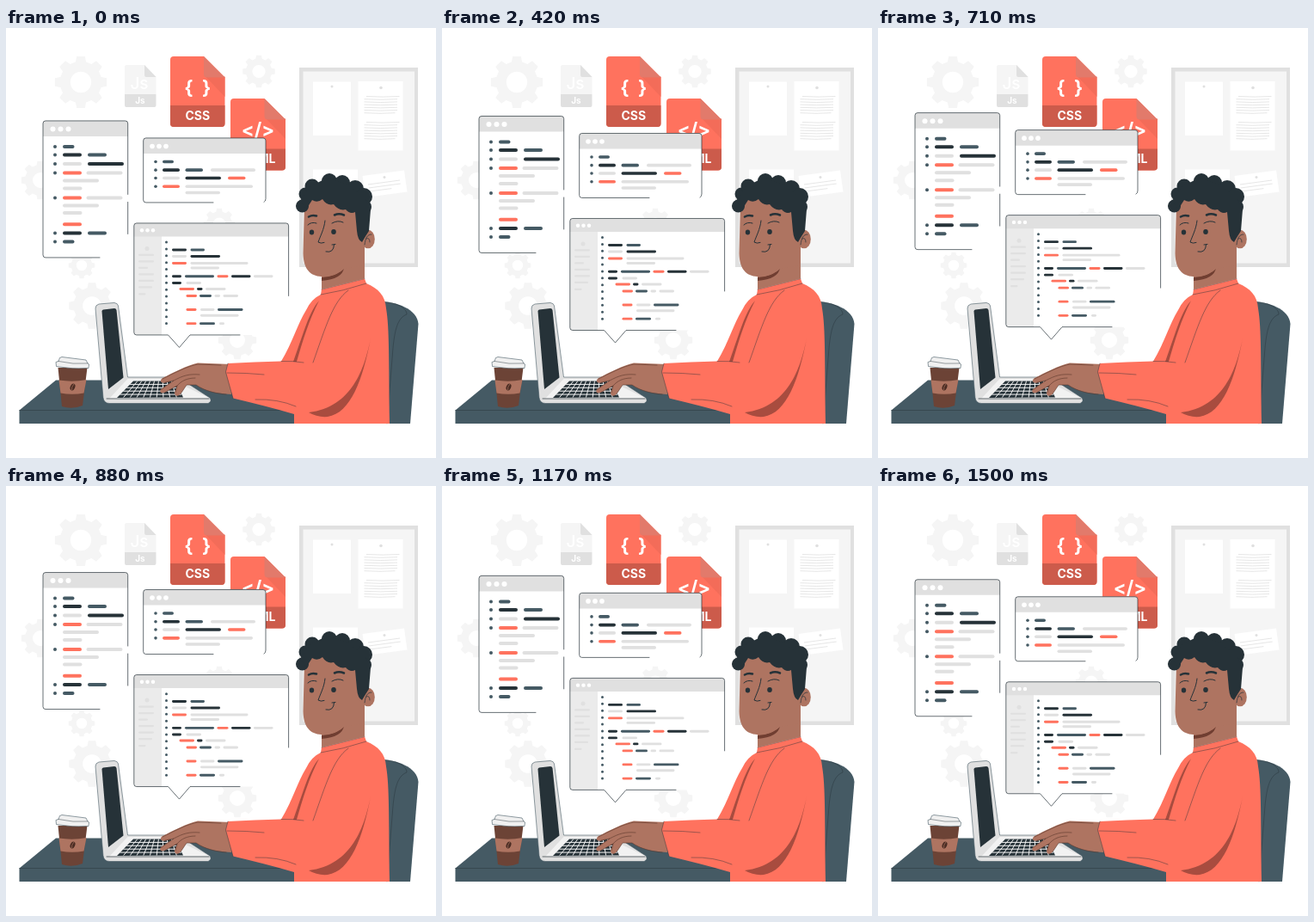
Recreate the animation shown at these times as an HTML page. Size 500x500 px, loop 1.54 s.

```html
<!DOCTYPE html>
<html lang="en">
<head>
<meta charset="utf-8">
<title>Coding at a desk</title>
<style>
html, body { margin: 0; width: 100%; height: 100%; overflow: hidden; background: #fff; }
svg { display: block; width: 100vw; height: 100vh; }
text { font-family: Inter, "Open Sans", sans-serif; font-weight: 700; fill: #fff; text-anchor: middle; }
.ln { fill: none; stroke: #263238; stroke-width: .7; stroke-linecap: round; stroke-linejoin: round; }
.thin { stroke-width: .45; }
.ink { fill: #263238; }
.slate { fill: #455a64; }
.grey { fill: #e0e0e0; }
.red { fill: #ff725e; }
.skin { fill: #ae7461; }
.shade { fill: #a84c3f; }
</style>
</head>
<body>
<svg viewBox="0 0 500 500" preserveAspectRatio="xMidYMid meet">
  <g id="gears" fill="#f5f5f5" fill-rule="evenodd"></g>

  <g id="board">
    <path class="grey" d="M341 46H479V278H341Z"/>
    <path fill="#f5f5f5" d="M345.500 50.500H475V273.500H345.500Z"/>
    <path fill="#fff" d="M357 62.500H401V125H357ZM409.500 62H461.500V142.500H409.500ZM357 164.500H409V225H357ZM414.500 172L463 165.500L466.500 190.500L418 197Z"/>
    <g class="grey"><circle cx="379" cy="68" r="1.500"/><circle cx="436" cy="69.500" r="1.800"/><circle cx="440" cy="173.500" r="1.500"/></g>
    <path id="notes" fill="none" stroke="#e0e0e0" stroke-width=".8"/>
  </g>

  <g id="files">
    <path fill="#f5f5f5" d="M140 43H161L174.500 57V77H138V45Q138 43 140 43Z"/>
    <path class="grey" d="M138 77H174.500V90Q174.500 92 172.500 92H140Q138 92 138 90ZM161 43L174.500 57H163Q161 57 161 55Z"/>
    <text x="155" y="71" font-size="19" style="font-weight:500">Js</text>
    <text x="156" y="88" font-size="10">Js</text>
    <g id="css"></g>
    <g id="html"></g>
  </g>

  <g id="float"></g>

  <g id="chair">
    <path class="slate" d="M430 318C452 317 478 326 479.500 344L470 460H436Z"/>
    <path class="ln thin" d="M437 318C453 319 466 325 466 333C455 337 452 352 450 372L443 460"/>
  </g>

  <g id="desk">
    <path class="slate" d="M58 409.500H340V460H15.500V444.500Z"/>
    <path class="ln thin" d="M15.500 444.500H336"/>
  </g>

  <g id="cup">
    <path fill="#6c4336" d="M60.500 395H94.500L89 439Q77 444 65 440Z"/>
    <path class="skin" d="M61.500 409.500Q78 412 93.500 409L90.500 424.500Q77 427 63.500 424.500Z"/>
    <ellipse cx="77.500" cy="417.500" rx="2.700" ry="4" fill="#4a2c23" transform="rotate(25 77.500 417.500)"/>
    <path stroke="#ae7461" stroke-width=".7" fill="none" d="M79 414Q76 417 76.500 421"/>
    <path fill="#f0f0f0" stroke="#455a64" stroke-width=".6" stroke-linejoin="round" d="M62.500 383.500L65 382.500L93 386L95 390L96.500 391L96 395.500Q77 397 58.500 393.500L58 388.500L61 387.500Z"/>
    <path class="ln thin" d="M61 387.500Q78 391.500 95 390"/>
  </g>

  <g id="laptop">
    <path fill="#e0e0e0" stroke="#455a64" stroke-width=".6" d="M108 321L126 319.500Q130 320 130.500 323L141.500 406L200 406L237 430Q240 434 235 436.500H120Q114 436 113 430L104 326Q104 322 108 321Z"/>
    <path fill="#f2f2f2" d="M120 431L141.500 408H190L237 430.500Z"/>
    <path class="ink" d="M111.500 329.500Q111.500 328 113 327.500L126 326Q128 326 128.500 328L136.500 406.500L119 420Z"/>
    <path class="ink" d="M129 430L148 410.500H197L206 429.500Z"/>
    <path id="keys" fill="none" stroke="#f2f2f2" stroke-width="1"/>
    <path class="ln" d="M117 431H236"/>
  </g>

  <g id="hands">
    <path class="skin" d="M262 391L223 389.500C211 392 194 401 182 407C178 410 180 413.500 185 412.500L195 410L180 420C178 424 181 426 186 423L199 416L196 424C196 429 201 429 204 424L210 415H221C231 422 244 425 262 426Z"/>
    <path class="ln" style="stroke:#5d382d;stroke-width:.6" d="M250 392L223 391C211 393 194 402 182 408M195 410C206 404 213 402 225 403M199 416C204 410 211 407 220 407M185 412L195 410L181 420M186 423L199 416L197 424M204 424L210 415H221C231 422 244 425 256 426"/>
  </g>

  <g id="body">
    <path class="red" d="M367 304L417 291.500L419 297C433 303 441 311 442 326C446 350 445 385 446 460H335V449C312 442 287 436 264 430.500L255.500 400L258 390Q290 388 320 387.500C333 366 339 344 349 328Q355 315 366 310Z"/>
    <path class="shade" d="M364 317C352 331 347 352 334 388L338 388C345 364 352 340 364 317Z"/>
    <path class="shade" d="M424 361C417 395 403 441 352 447Q362 453 374 452C401 448 415 408 424 361Z"/>
    <path class="ln thin" d="M367 304L417 291.500M366 310Q392 306 419 297M398 305C380 318 372 347 357 389M320 387.500Q333 387 346 389M258 390L255.500 400L264 430.500M257 401Q280 401 300 403M290 432Q316 431 337 440"/>
  </g>

  <g id="head">
    <path class="skin" d="M367 270H417V291.500L367 304Z"/>
    <path fill="#703e31" d="M367 290Q385 289 393 279Q391 292 367 294Z"/>
    <path class="skin" d="M347 205L345.500 262C346 285 358 290 372 289C382 288 389 284 393 280L417 276V195H352Z"/>
    <ellipse class="skin" cx="421" cy="245.500" rx="7.800" ry="10.800"/>
    <path class="ln" d="M417 252C418 244 420 240 425 240M419 245Q423 243 423 249"/>
    <g id="curls" class="ink"></g>
    <path class="ink" d="M342 201L354 184L374 174L398 182L418 199L424 211L422 236Q418 242 414 249Q409 247 408 236L406 214Q400 217 395 211Q387 213 381 205Q373 207 368 199Q362 204 356 200Q352 205 350 212Z"/>
    <path class="ln" style="stroke-width:2.600" d="M352 219.500Q356 217 361 218.500M382 217.500Q387 215 393 217.500"/>
    <path class="ln" style="stroke-width:1" d="M351 229Q355 225 361 227M379 227Q386 223 392 226M371 224C370 234 365 243 363 249Q366 251 370 249.500M372 260Q381 262 381.500 252M379 252L383 251.500"/>
    <g class="ink"><ellipse cx="355.500" cy="237.500" rx="2.700" ry="3"/><ellipse cx="381" cy="237" rx="2.800" ry="3"/></g>
  </g>
</svg>

<script>
const $ = id => document.getElementById(id);
const add = (id, html) => $(id).insertAdjacentHTML('beforeend', html);

// cx, cy, outer radius
function gear([cx, cy, r]) {
  const teeth = 8, hole = r * .4;
  const pts = [];
  for (let i = 0; i < teeth; i++) {
    for (const [a, k] of [[-.32, .8], [-.2, 1], [.2, 1], [.32, .8]]) {
      const th = (i + a) / teeth * Math.PI * 2;
      pts.push((cx + r * k * Math.sin(th)).toFixed(1) + ' ' + (cy - r * k * Math.cos(th)).toFixed(1));
    }
  }
  return `<path d="M${pts.join('L')}ZM${cx - hole} ${cy}a${hole} ${hole} 0 1 0 ${2 * hole} 0a${hole} ${hole} 0 1 0 ${-2 * hole} 0Z"/>`;
}
add('gears', [[87, 63, 30.5], [294, 50.5, 19], [40, 177, 22.5], [88, 276, 15.5],
  [100, 323, 27], [269, 363, 22.5], [248, 228, 18.5]].map(gear).join(''));

function file(x, y, w, h, mark, label) {
  const r = x + w, b = y + h, fold = 24.5, band = b - 25;
  return `<path class="red" d="M${x + 4} ${y}H${r - fold}L${r} ${y + fold}V${b - 4}Q${r} ${b} ${r - 4} ${b}H${x + 4}Q${x} ${b} ${x} ${b - 4}V${y + 4}Q${x} ${y} ${x + 4} ${y}Z"/>
    <path fill="#cc5b4b" d="M${x} ${band}H${r}V${b - 4}Q${r} ${b} ${r - 4} ${b}H${x + 4}Q${x} ${b} ${x} ${b - 4}Z"/>
    <path fill="#f36c59" d="M${r - fold + 2} ${y + fold - 1}H${r}V${y + fold * 2 - 2}Z"/>
    <path fill="#e27a6b" d="M${r - fold} ${y}L${r} ${y + fold}H${r - fold + 4}Q${r - fold} ${y + fold} ${r - fold} ${y + fold - 4}Z"/>
    <text x="${x + w / 2}" y="${y + 43.5}" font-size="22">${mark}</text>
    <text x="${x + w / 2}" y="${b - 8.5}" font-size="14">${label}</text>`;
}
add('css', file(191, 33, 63.5, 82, '{&#160;&#160;}', 'CSS'));
add('html', file(261, 82, 64, 83.5, '&lt;/&gt;', 'HTML'));

let notes = '';
for (const top of [79.5, 109.5])
  for (let i = 0; i < 7; i++) notes += `M${i ? 416.5 : 419} ${top + i * 3.2}q19 1.200 ${i === 6 ? 36 : 38.5} 0`;
for (let i = 0; i < 3; i++) notes += `M${421 + i * .7} ${182 + i * 4}l${i === 2 ? 26 : 37} ${i === 2 ? -3.4 : -5}`;
$('notes').setAttribute('d', notes);

let keys = '';
for (let i = 1; i < 5; i++) keys += `M${148 - i * 3.9} ${410.5 + i * 3.9}H${197 + i * 1.8}`;
for (let i = 1; i < 10; i++) keys += `M${148 + i * 4.9} 410.500L${129 + i * 7.7} 429.500`;
$('keys').setAttribute('d', keys);

add('curls', [[344.5, 207, 7.5], [348, 193, 7.5], [356, 184, 8.5], [376, 178, 9], [391, 180, 9],
  [406, 187, 10], [416, 196, 10], [417, 208, 8]]
  .map(([x, y, r]) => `<circle cx="${x}" cy="${y}" r="${r}"/>`).join(''));

const tone = { k: 'ink', s: 'slate', g: 'grey', r: 'red' };

// each row: "y: tone x1-x2, ..."; a star after y adds a bullet
function rows(src, h, bx) {
  return src.trim().split('\n').map(line => {
    const [head, bars] = line.trim().split(':');
    const y = parseFloat(head);
    const dot = head.includes('*') ? `<circle class="slate" cx="${bx}" cy="${y}" r="${h / 2}"/>` : '';
    return dot + bars.split(',').map(bar => {
      const [c, span] = bar.trim().split(' ');
      const [a, b] = span.split('-');
      return `<rect class="${tone[c]}" x="${a}" y="${y - h / 2}" width="${b - a}" height="${h}" rx="${h / 2}"/>`;
    }).join('');
  }).join('');
}

function pane({ x, y, r, b, bar, dots, outline, tail = '', inside = '', body }) {
  const round = 3;
  return `<path fill="#fff" d="M${x + round} ${y}H${r - round}Q${r} ${y} ${r} ${y + round}V${b}${tail}H${x + round}Q${x} ${b} ${x} ${b - round}V${y + round}Q${x} ${y} ${x + round} ${y}Z"/>
    ${inside}
    <path class="grey" d="M${x} ${y + bar}V${y + round}Q${x} ${y} ${x + round} ${y}H${r - round}Q${r} ${y} ${r} ${y + round}V${y + bar}Z"/>
    ${[0, 1, 2].map(i => `<circle fill="#fff" cx="${dots[0] + i * dots[1]}" cy="${y + bar / 2 + .5}" r="${dots[2]}"/>`).join('')}
    ${body}<path class="ln" d="${outline}"/>`;
}

const side = rows(`
  264.5:g 154-172
  272:g 154-172
  279.5:g 154-165
  287:g 154-172
  294.5:g 154-172
  302:g 154-170
  310:g 154-162.500`, 2.2, 0);

let bullets = '';
for (let i = 0; i < 13; i++) bullets += `<circle class="slate" cx="186.500" cy="${249.6 + i * 7.88}" r="1.500"/>`;

add('float', pane({
  x: 43, y: 108.5, r: 141.7, b: 267.5, bar: 18, dots: [54.5, 9, 3],
  outline: 'M109 267.500H46Q43 267.500 43 264.500V111.500Q43 108.500 46 108.500H138.700Q141.700 108.500 141.700 111.500V194M141.700 203V240',
  body: rows(`
    138.5*:s 66-79.500
    148*:k 66-88,s 95-117
    158.5*:g 66-88,k 95-137
    169*:r 66-88,g 93.500-135.500
    178:g 66-108
    187:g 66-88.500
    198*:r 66-88,g 93.500-135.500
    207:g 66-108
    215.5:g 66-88.500
    228.7:r 66-88
    239*:k 66-88,s 95-117
    249*:s 66-79.500`, 4, 57)
}) + pane({
  x: 159.7, y: 128.5, r: 302, b: 203.5, bar: 18, dots: [170, 8, 2.8],
  outline: 'M241 203.500H162.700Q159.700 203.500 159.700 200.500V131.500Q159.700 128.500 162.700 128.500H299Q302 128.500 302 131.500V199Q302 202 300 203',
  body: rows(`
    156*:s 182-195
    165.7*:k 182-202,s 208.500-229,g 238-290
    175*:g 182-202,k 208.500-250,r 258-278.500
    184.8*:r 182-202,g 208.500-287
    192:g 208.500-249`, 3.6, 174)
}) + pane({
  x: 148.8, y: 227.5, r: 328.6, b: 357.5, bar: 15.5, dots: [158, 6.5, 2.2],
  tail: 'H214L201.500 372L188.500 357.500',
  outline: 'M272 357.500H214L201.500 372L188.500 357.500H151.800Q148.800 357.500 148.800 354.500V230.500Q148.800 227.500 151.800 227.500H325.600Q328.600 227.500 328.600 230.500V312',
  inside: `<path fill="#ebebeb" d="M149 240H181V357.500H152Q149 357.500 149 354.500Z"/><circle class="grey" cx="164" cy="257" r="2.500"/>`,
  body: side + bullets + rows(`
    258.5:k 193-210,s 214.500-231
    266:g 193-210,k 214.500-249
    274:r 193-210,g 214.500-281.500
    279.5:g 214.500-248
    289.3:k 193-204,s 208-242,r 245.500-258.500,k 262-284.500,g 288-310.500
    297:k 193-204,g 209.500-227
    304:r 201.500-219,k 222-228.500,g 232-255.500
    312:r 209.500-222,s 225-239,g 242.500-249,g 252.500-270
    328:r 209.500-221.500,g 226-242.500,s 246-275.500
    334.8:g 226-270.500
    344.2:r 209.500-221.500,s 225-243,g 248-254`, 2.9, 0)
}));

// windows rise and sink at constant speed, 24 poses a second
const LOOP = 1540, STEP = 1000 / 24, RISE = 10, TOP = 17.25, HALF = 18.25;
const panes = $('float');
function draw() {
  const k = Math.min(36, Math.floor((performance.now() % LOOP + 5) / STEP));
  const dy = -RISE * (1 - Math.abs(k - TOP) / HALF);
  panes.setAttribute('transform', `translate(0 ${dy.toFixed(3)})`);
  requestAnimationFrame(draw);
}
draw();
</script>
</body>
</html>
```
